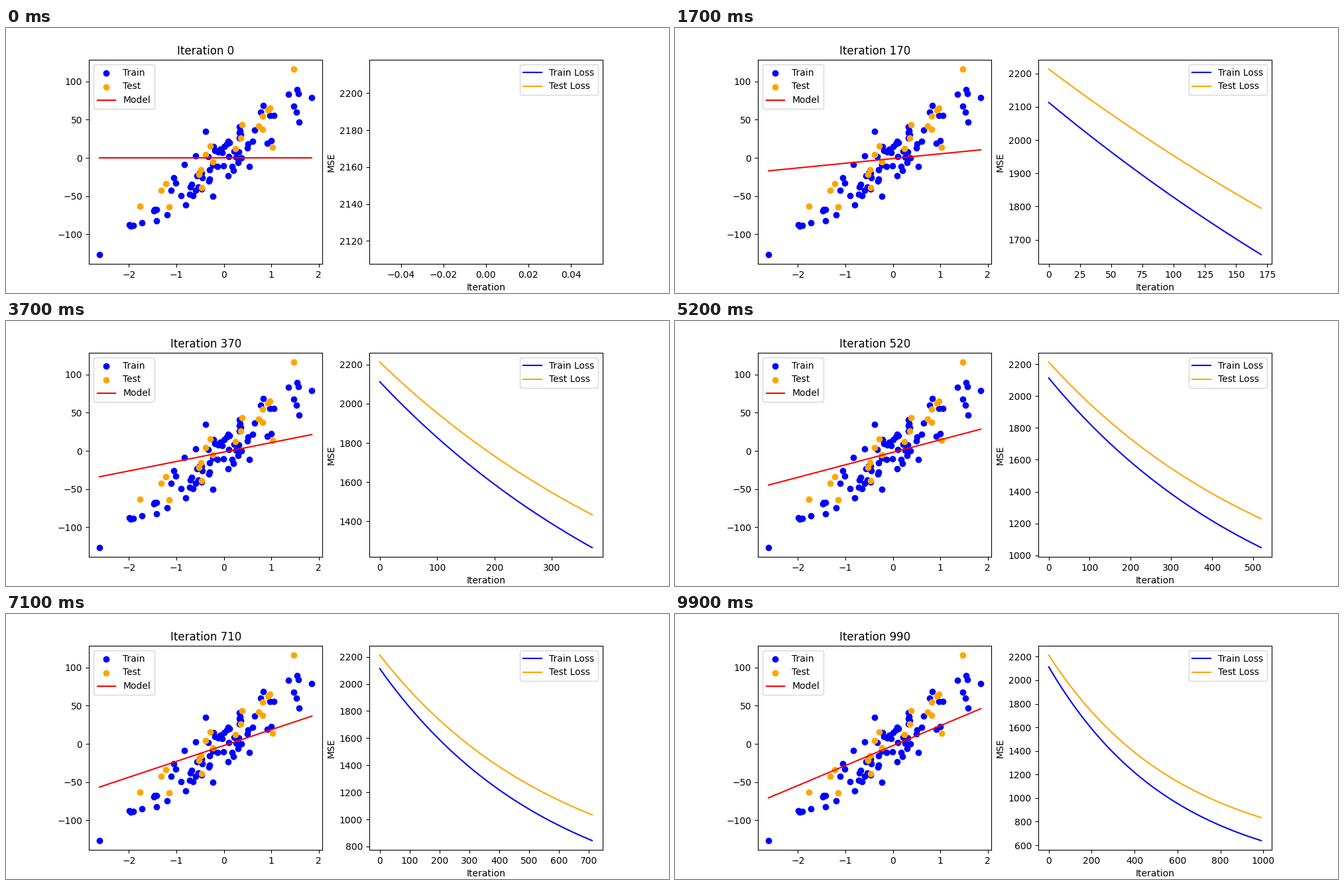
Animation of 1000x400 px, one loop 10000 ms. Source, as a matplotlib script:

```python
import numpy as np
import matplotlib.pyplot as plt
from matplotlib.animation import FuncAnimation

SEED = 42
SAMPLES = 100
TEST_SIZE = 20
NOISE = 20
RATE = 0.001
STEPS = 1000
STRIDE = 10


def make_data():
    """Noisy linear data, shuffled and split into train and test parts."""
    rng = np.random.RandomState(SEED)
    x = rng.standard_normal(SAMPLES)
    y = 100 * rng.uniform() * x
    y = y + rng.normal(scale=NOISE, size=SAMPLES)
    order = np.arange(SAMPLES)
    rng.shuffle(order)
    x, y = x[order], y[order]
    pick = np.random.RandomState(SEED).permutation(SAMPLES)
    test, train = pick[:TEST_SIZE], pick[TEST_SIZE:]
    return x[train], y[train], x[test], y[test]


def descend(x, y, x_test, y_test):
    """Gradient descent; returns slope, bias, train and test loss per step."""
    w = b = 0.0
    rows = []
    for _ in range(STEPS):
        err = w * x + b - y
        test_err = w * x_test + b - y_test
        rows.append((w, b, np.mean(err ** 2), np.mean(test_err ** 2)))
        w -= RATE * np.mean(err * x)
        b -= RATE * np.mean(err)
    return np.array(rows).T


x_train, y_train, x_test, y_test = make_data()
slope, bias, train_loss, test_loss = descend(x_train, y_train, x_test, y_test)
steps = np.arange(STEPS)
ends = np.array([x_train.min(), x_train.max()])

fig, (ax_fit, ax_loss) = plt.subplots(1, 2, figsize=(10, 4), dpi=100)

ax_fit.scatter(x_train, y_train, color="blue", label="Train")
ax_fit.scatter(x_test, y_test, color="orange", label="Test")
model, = ax_fit.plot(ends, 0 * ends, color="red", label="Model")
ax_fit.legend(loc="upper left")
title = ax_fit.set_title("Iteration 0")

train_line, = ax_loss.plot([], [], color="blue", label="Train Loss")
test_line, = ax_loss.plot([], [], color="orange", label="Test Loss")
ax_loss.set_xlabel("Iteration")
ax_loss.set_ylabel("MSE")
ax_loss.legend(loc="upper right")


def update(frame):
    i = frame * STRIDE
    model.set_ydata(slope[i] * ends + bias[i])
    title.set_text(f"Iteration {i}")
    train_line.set_data(steps[:i + 1], train_loss[:i + 1])
    test_line.set_data(steps[:i + 1], test_loss[:i + 1])
    ax_loss.relim()
    ax_loss.autoscale_view()
    return model, title, train_line, test_line


anim = FuncAnimation(fig, update, frames=STEPS // STRIDE,
                     init_func=lambda: update(0), interval=100,
                     repeat=True, repeat_delay=0)
plt.show()
```
